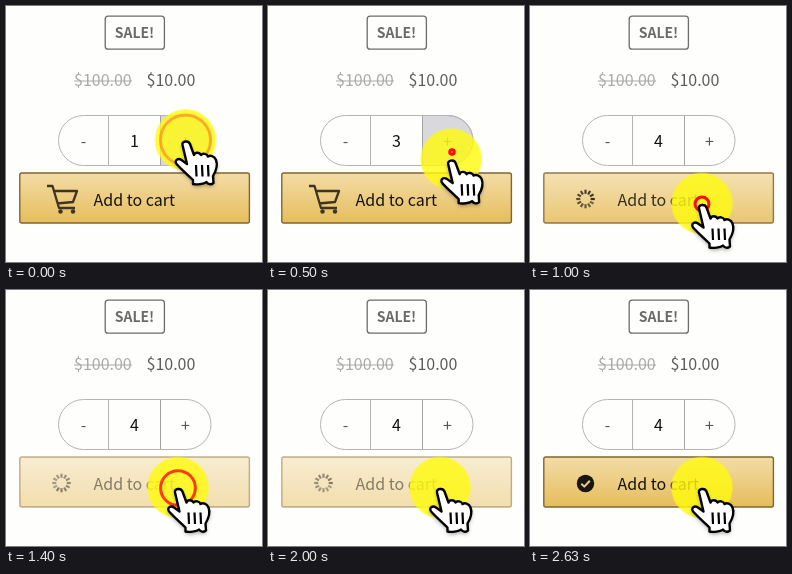
Write an HTML page with a canvas that moves like this. It is 256 px wide and 256 px high and loops after 2800 ms.

```html
<!DOCTYPE html>
<html lang="en">
<head>
<meta charset="utf-8">
<title>Add to cart</title>
<style>
html, body { margin: 0; height: 100%; overflow: hidden; background: #fefefd; }
canvas { display: block; width: 256px; height: 256px; }
</style>
</head>
<body>
<canvas id="stage" width="256" height="256"></canvas>
<script>
const ctx = document.getElementById('stage').getContext('2d');
const LOOP = 2800;
const FONT = '"Noto Sans CJK SC", "Noto Sans CJK JP", "Noto Sans CJK", "Open Sans", sans-serif';

// time, x, y of the pointer
const route = [
  [0, 179.5, 134], [240, 179.5, 133], [300, 179.5, 139], [400, 181, 141], [480, 184, 146],
  [530, 182, 163], [660, 175, 183], [800, 172, 197.5], [LOOP, 172, 197.5]
];
// time, x, y of each click
const clicks = [[-885, 179.5, 134], [260, 179, 132.5], [370, 181, 139], [490, 184, 146], [810, 172, 198]];

const cart = new Path2D('M41 180h5.5l6.5 22h16M48 185h23l-4 11-16 1.5');
const hand = new Path2D(`M-3.5 3C-4.500-1 2.500-2 4 2L8 13C9 10 13.500 10 15 13
  C16.500 11 21 11.500 22 14.500C24 13 28.500 14 30 18C32 23 30 29 27 34L27.500 41
  C25 43 22 42.500 20.500 40C18.500 42 10 43 7 42V38C2 33-4 28-9 22.500
  C-12.500 18.500-8 15.500-4.500 18L1 22Z`);

const ramp = (t, from, to) => Math.min(1, Math.max(0, (t - from) / (to - from)));

function pointerAt(t) {
  const i = route.findIndex(key => key[0] > t);
  const [t0, x0, y0] = route[i - 1], [t1, x1, y1] = route[i];
  const k = ramp(t, t0, t1);
  return [x0 + (x1 - x0) * k, y0 + (y1 - y0) * k];
}

function text(str, x, y, color, { size = 16, weight = 400, align = 'left' } = {}) {
  ctx.font = `${weight} ${size}px ${FONT}`;
  ctx.textAlign = align;
  ctx.fillStyle = color;
  ctx.fillText(str, x, y);
}

function box(x, y, w, h, radius, stroke, width, fill) {
  ctx.beginPath();
  ctx.roundRect(x, y, w, h, radius);
  if (fill) { ctx.fillStyle = fill; ctx.fill(); }
  ctx.lineWidth = width;
  ctx.strokeStyle = stroke;
  ctx.stroke();
}

function line(x0, y0, x1, y1, color, width) {
  ctx.beginPath();
  ctx.moveTo(x0, y0);
  ctx.lineTo(x1, y1);
  ctx.lineWidth = width;
  ctx.strokeStyle = color;
  ctx.stroke();
}

function disc(x, y, r, fill) {
  ctx.beginPath();
  ctx.arc(x, y, r, 0, 2 * Math.PI);
  ctx.fillStyle = fill;
  ctx.fill();
}

function drawPrice() {
  box(99.2, 10.2, 59.2, 33, 3, '#6c6c6c', 1.3);
  text('SALE!', 128.5, 32, '#6a6a6a', { size: 14, weight: 700, align: 'center' });
  text('$100.00', 68, 80, '#aaa');
  line(68, 75, 126, 75, '#aaa', 1.2);
  text('$10.00', 140.5, 80, '#5c5c5c');
}

function drawQuantity(t) {
  ctx.globalAlpha = 1 - ramp(t, 680, 760);
  box(154.5, 109.5, 50.5, 50, [0, 25, 25, 0], '#b4b4b4', 1, '#d9d8dc');
  ctx.globalAlpha = 1;
  box(52.5, 109.5, 152.5, 50, 25, '#b4b4b4', 1);
  line(102.5, 110, 102.5, 159, '#b4b4b4', 1);
  line(154.5, 110, 154.5, 159, '#a2a2a2', 1);
  const count = 1 + [320, 420, 520].filter(at => t >= at).length;
  text('-', 77.5, 141, '#555', { align: 'center' });
  text(count, 128.5, 141, '#111', { weight: 500, align: 'center' });
  text('+', 179.5, 141, '#555', { weight: 500, align: 'center' });
}

function drawCart() {
  const color = '#3f3421';
  ctx.lineWidth = 2.3;
  ctx.lineJoin = 'round';
  ctx.strokeStyle = color;
  ctx.stroke(cart);
  disc(54.5, 205.5, 2.2, color);
  disc(67, 205.5, 2.2, color);
}

function drawSpinner(t) {
  const ticks = 12, head = Math.floor(t / 1000 * ticks);
  ctx.save();
  ctx.translate(55.5, 193);
  for (let i = 0; i < ticks; i++) {
    const age = (head - i + ticks) % ticks;
    const a = i / ticks * 2 * Math.PI;
    const c = Math.cos(a), s = Math.sin(a);
    line(5.2 * c, 5.2 * s, 9.3 * c, 9.3 * s, `rgba(25,20,12,${1 - age * 0.03})`, 2.2);
  }
  ctx.restore();
}

function drawCheck() {
  disc(55.5, 193.5, 8.7, '#191612');
  ctx.beginPath();
  ctx.moveTo(51.3, 193.7);
  ctx.lineTo(54.3, 196.6);
  ctx.lineTo(59.8, 190.7);
  ctx.lineWidth = 2;
  ctx.strokeStyle = '#edcd82';
  ctx.stroke();
}

function drawButton(t) {
  ctx.globalAlpha = 1 - 0.5 * (ramp(t, 900, 1250) - ramp(t, 2130, 2450));
  const gold = ctx.createLinearGradient(0, 167, 0, 217);
  gold.addColorStop(0, '#f3dca6');
  gold.addColorStop(1, '#e6bd5c');
  box(13.8, 167, 229.6, 50, 2, '#80662f', 1.4, gold);
  if (t < 900) drawCart();
  else if (t < 2300) drawSpinner(t);
  else drawCheck();
  text('Add to cart', 87.5, 200, '#14110b');
  ctx.globalAlpha = 1;
}

function drawRing(t) {
  const [at, x, y] = clicks.findLast(click => click[0] <= t);
  const age = (t - at) / 1000;
  if (age >= 1) return;
  ctx.beginPath();
  ctx.arc(x, y, 2 + 26 * age, 0, 2 * Math.PI);
  ctx.lineWidth = 3;
  ctx.strokeStyle = `rgba(255,10,10,${1 - age ** 3})`;
  ctx.stroke();
}

function drawPointer(t) {
  const [x, y] = pointerAt(t);
  const glow = ctx.createRadialGradient(x, y, 29.5, x, y, 31.5);
  glow.addColorStop(0, 'rgba(255,250,15,.82)');
  glow.addColorStop(1, 'rgba(255,250,15,0)');
  disc(x, y, 31.5, glow);
  drawRing(t);

  ctx.save();
  ctx.translate(x + 0.5, y + 2);
  ctx.lineJoin = 'round';
  ctx.shadowColor = 'rgba(0,0,0,.4)';
  ctx.shadowBlur = 4;
  ctx.shadowOffsetY = 2;
  ctx.fillStyle = '#fff';
  ctx.fill(hand);
  ctx.shadowColor = 'transparent';
  ctx.lineWidth = 2.4;
  ctx.strokeStyle = '#000';
  ctx.stroke(hand);
  for (const lx of [10, 16, 22]) line(lx, 23, lx + 0.5, 34.5, '#000', 2.2);
  ctx.restore();
}

function draw() {
  const t = (performance.now() - start) % LOOP;
  ctx.fillStyle = '#fefefd';
  ctx.fillRect(0, 0, 256, 256);
  drawPrice();
  drawQuantity(t);
  drawButton(t);
  drawPointer(t);
  requestAnimationFrame(draw);
}

const start = performance.now();
draw();
</script>
</body>
</html>
```
